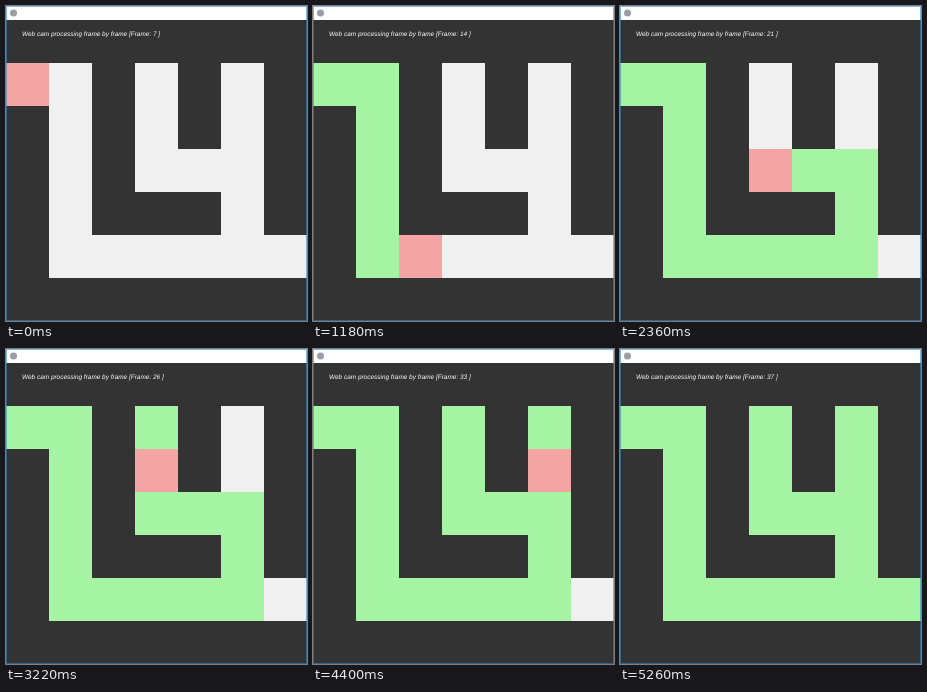
Write an HTML page with a canvas that moves like this. It is 301 px wide and 315 px high and loops after 7880 ms.

```html
<!DOCTYPE html>
<html lang="en">
<head>
<meta charset="utf-8">
<title>Maze walk</title>
<style>
  html, body { margin: 0; width: 100%; height: 100%; overflow: hidden; background: #333; }
  canvas { display: block; }
</style>
</head>
<body>
<canvas id="stage" width="301" height="315"></canvas>
<script>
const ctx = document.getElementById('stage').getContext('2d');
const LOOP = 7880, CELL = 43, TOP = 14;
const FIRST = 7;
const COLORS = { wall: '#333333', open: '#f0f0f0', seen: '#a4f4a4', walker: '#f5a4a4' };

// One letter per step; a dot waits in place.
const MOVES = '.RDDDDRRRRUULLUU..DDRRUU.DDDDR';
const DIRS = { R: [1, 0], L: [-1, 0], U: [0, -1], D: [0, 1], '.': [0, 0] };
const LAST = MOVES.length + 1;

const path = [[0, 1]];
for (const m of MOVES) {
  const [x, y] = path[path.length - 1];
  path.push([x + DIRS[m][0], y + DIRS[m][1]]);
}

// Steps are 170 ms apart, with every second one 10 ms early.
const stepStart = i => i ? 160 + (i - 1) * 170 - (i % 2 ? 0 : 10) : 0;

function stepAt(t) {
  let i = LAST;
  while (i > 0 && stepStart(i) > t) i--;
  return i;
}

function rect(color, x, y, w, h) {
  ctx.fillStyle = color;
  ctx.fillRect(x, y, w, h);
}

function cell([x, y], color) {
  rect(color, x * CELL, TOP + y * CELL, CELL, CELL);
}

function drawLabel(text) {
  ctx.save();
  ctx.scale(0.5, 0.5);
  ctx.font = 'italic 12.9px "Liberation Sans", Arial, sans-serif';
  ctx.textRendering = 'geometricPrecision';
  ctx.fillStyle = '#ffffff';
  ctx.fillText(text, 32, 60);
  ctx.restore();
}

function drawWindow() {
  rect('#ffffff', 0, 0, 301, TOP);
  ctx.fillStyle = '#9a9fa6';
  ctx.beginPath();
  ctx.arc(7.5, 7, 3.5, 0, Math.PI * 2);
  ctx.fill();
  ctx.strokeStyle = 'rgba(50, 135, 195, 0.6)';
  ctx.lineWidth = 1;
  ctx.strokeRect(0.5, 0.5, 300, 314);
}

function draw(t) {
  const step = stepAt(t);
  rect(COLORS.wall, 0, 0, 301, 315);
  path.forEach(p => cell(p, COLORS.open));
  path.slice(0, step).forEach(p => cell(p, COLORS.seen));
  if (step < LAST) cell(path[step], COLORS.walker);
  const count = FIRST + Math.min(step, MOVES.length);
  drawLabel(`Web cam processing frame by frame [Frame: ${count} ]`);
  drawWindow();
}

const start = performance.now();
function tick() {
  draw((performance.now() - start) % LOOP);
  requestAnimationFrame(tick);
}
tick();
</script>
</body>
</html>
```
